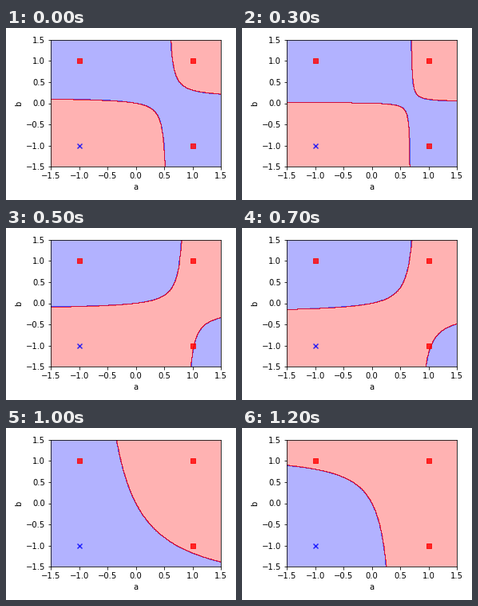
A matplotlib script for the animation above (1300 ms loop, 288 by 216 pixels).

```python
import numpy as np
import matplotlib.pyplot as plt
from matplotlib.animation import FuncAnimation
from matplotlib.colors import ListedColormap

FRAMES, STEP_MS = 13, 100
LIMIT, RES = 1.5, 0.01
START = np.array([-3.486, -14.415, 25.70])

POINTS = np.array([[-1, -1], [-1, 1], [1, -1], [1, 1]])
CLASSES = np.array([-1, 1, 1, 1])
CMAP = ListedColormap(["blue", "red"])

plt.rcParams["font.family"] = "DejaVu Sans"
fig, ax = plt.subplots(figsize=(4, 3), dpi=72)
axis = np.arange(-LIMIT, LIMIT + RES / 2, RES)
A, B = np.meshgrid(axis, axis)


def features(a, b):
    return np.stack([a, b, a * b], axis=-1)


def train(steps):
    """Batch perceptron: add up the corrections of all misclassified points."""
    x = features(*POINTS.T)
    w = START
    history = [w]
    for _ in range(steps - 1):
        wrong = CLASSES * (x @ w) < 0
        w = w + CLASSES[wrong] @ x[wrong]
        history.append(w)
    return history


def draw(step):
    ax.clear()
    label = np.where(features(A, B) @ history[step] >= 0, 1.0, -1.0)
    ax.contourf(A, B, label, cmap=CMAP, alpha=0.3)
    for cls, color, marker in [(1, "red", "s"), (-1, "blue", "x")]:
        ax.scatter(*POINTS[CLASSES == cls].T, c=color, marker=marker, alpha=0.8)
    ax.set(xlim=(axis.min(), axis.max()), ylim=(axis.min(), axis.max()),
           xlabel="a", ylabel="b")


history = train(FRAMES)
draw(0)
fig.tight_layout()
anim = FuncAnimation(fig, draw, frames=FRAMES, init_func=lambda: None,
                     interval=STEP_MS, repeat=True, repeat_delay=0)
plt.show()
```
